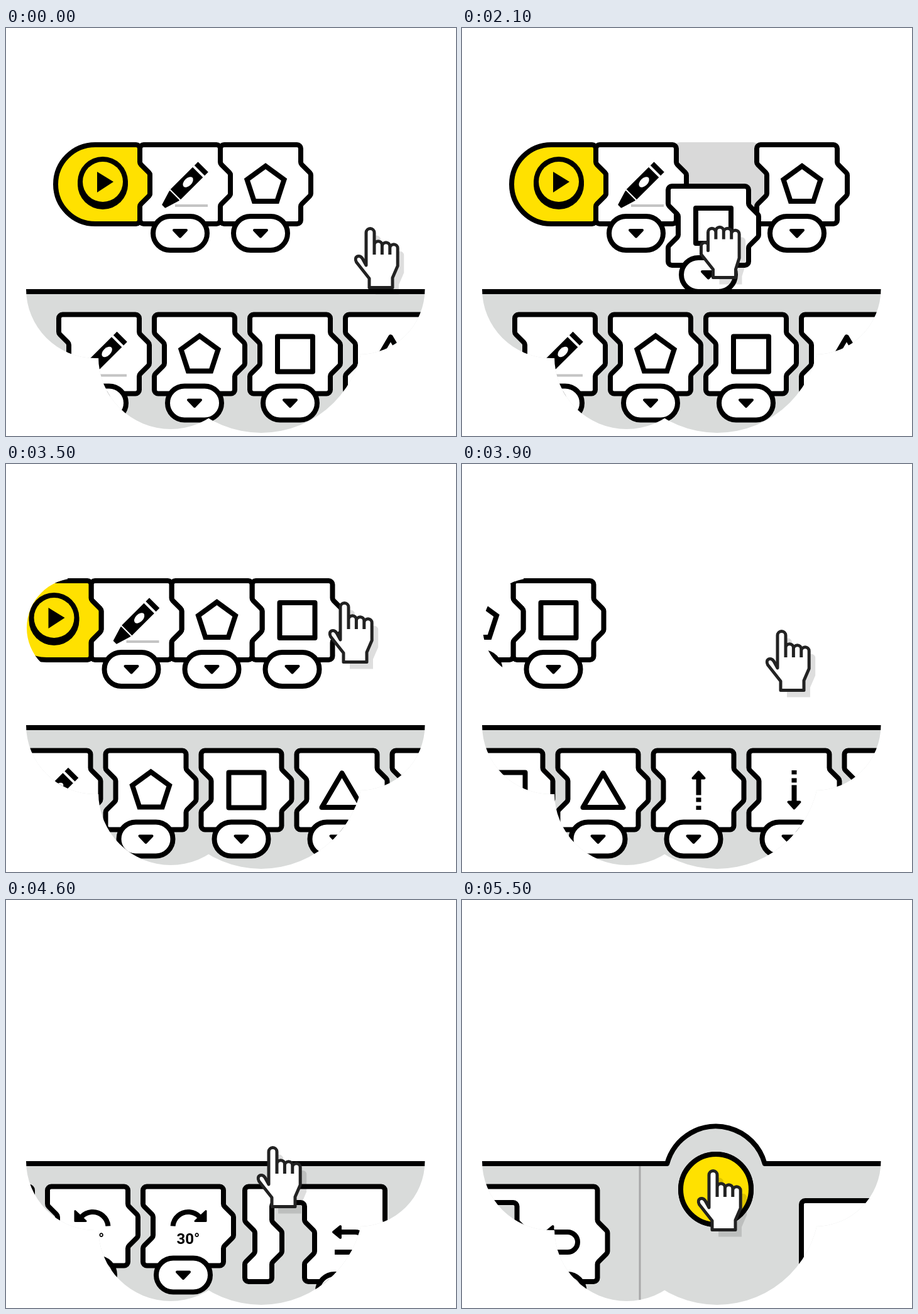
An HTML page with a canvas that plays this animation: 716x650 px, repeating every 7.5 s.

```html
<!DOCTYPE html>
<html lang="en">
<head>
<meta charset="utf-8">
<title>Block coding</title>
<style>
html, body { margin: 0; width: 100%; height: 100%; overflow: hidden; background: #fff; }
canvas { display: block; }
</style>
</head>
<body>
<canvas id="stage" width="716" height="650"></canvas>
<script>
const c = document.getElementById('stage').getContext('2d');
const GREY = '#d9dbda', YELLOW = '#ffe100';
const LOOP = 7500, STEP = 100;
const HOME = 388, SHELF = 456.5, ROW = 186, W = 128, PITCH = 152;

const POINTER = new Path2D('M20 62V10a6.5 6.5 0 0 1 13 0V30a6.2 6.2 0 0 1 12.4 0v2a6.2 6.2 0 0 1 12.4 0' +
  'v3a6.2 6.2 0 0 1 12.4 0V63L62 82V97.5H25V83L4.5 57C0 48 9 44 14 51Z' +
  'M33 29V45M45.4 31V45M57.8 34V45');
const FIST = new Path2D('M14 40V11a6.2 6.2 0 0 1 12.4 0V9a6.2 6.2 0 0 1 12.4 0v2a6.2 6.2 0 0 1 12.4 0' +
  'v3a6.2 6.2 0 0 1 12.4 0V52L58 70V83H22V70L3 46V34a6 6 0 0 1 11-4Z' +
  'M26.4 10V22M38.8 11V22M51.2 13V22');

const clamp = (v, a, b) => Math.min(b, Math.max(a, v));

// Linear interpolation through [time, x, y] keys.
function along(keys, t) {
  let i = 1;
  while (i < keys.length - 1 && t > keys[i][0]) i++;
  const [t0, x0, y0] = keys[i - 1], [t1, x1, y1] = keys[i];
  const k = clamp((t - t0) / (t1 - t0), 0, 1);
  return [x0 + (x1 - x0) * k, y0 + (y1 - y0) * k];
}

const DRAG = [[1200, 0, 0], [1300, -6.5, -30], [1500, -38, -80], [1900, -73, -124], [2000, -70, -165],
  [2100, -60, -204.5], [2700, 80, -290], [3100, 81, -270.5]];
const APPROACH = [[300, 553, 316], [500, 543, 328], [900, 435, 460], [1100, 425, 472]];
const LEAVE = [[3400, 515, 214], [3500, 512, 218], [3900, 482, 263], [4200, 446, 317], [4600, 398, 391],
  [4800, 388, 392], [5200, 388, 392], [5500, 373, 428]];

function ink(fill, width = 8, stroke = '#000') {
  if (fill) { c.fillStyle = fill; c.fill(); }
  if (width) { c.lineWidth = width; c.strokeStyle = stroke; c.stroke(); }
}

function poly(pts, r = 0) {
  const [a, b] = [pts[0], pts[pts.length - 1]];
  c.beginPath();
  c.moveTo((a[0] + b[0]) / 2, (a[1] + b[1]) / 2);
  pts.forEach((p, i) => c.arcTo(...p, ...pts[(i + 1) % pts.length], r));
  c.closePath();
}

function disc(x, y, r, fill, width = 0) {
  c.beginPath();
  c.arc(x, y, r, 0, 7);
  ink(fill, width);
}

function line(pts, width = 8, color = '#000') {
  c.beginPath();
  pts.forEach(p => c.lineTo(...p));
  ink(null, width, color);
}

const tab = (x, y) => [[x, y + 30], [x + 16, y + 46], [x + 16, y + 80], [x, y + 96]];
const notch = (x, y) => tab(x, y).reverse();

function outline(x, y) {
  poly([[x, y], [x + W, y], ...tab(x + W, y), [x + W, y + 126], [x, y + 126], ...notch(x, y)], 6);
}

function pill(x, y) {
  c.beginPath();
  c.roundRect(x - 43, y - 27, 86, 54, 27);
  ink('#fff');
  poly([[x - 10, y - 5], [x + 10, y - 5], [x, y + 5.5]]);
  ink('#000', 4);
}

function straightArrow(dir) {
  c.scale(1, dir);
  poly([[-9, -19], [9, -19], [0, -29]]);
  ink('#000', 4);
  line([[0, -20], [0, 8]]);
  c.fillRect(-4, 12, 8, 7);
  c.fillRect(-4, 25, 8, 6.5);
}

function turnArrow(dir) {
  c.fillStyle = '#000';
  c.font = '700 24px Roboto, sans-serif';
  c.textAlign = 'center';
  c.fillText('30°', 0, 28);
  c.scale(dir, 1);
  c.beginPath();
  c.arc(0, 2, 24.5, Math.PI + .08, -.75);
  ink(null);
  poly([[28, -24], [28, -8], [11, -8]]);
  ink('#000', 3);
}

const icons = {
  crayon() {
    line([[-16, 34], [36, 34]], 4, '#c4c4c4');
    c.translate(-35, 36);
    c.rotate(-Math.PI / 4);
    poly([[2, -3], [25, -10], [25, 10], [2, 3]]);
    ink('#000', 2);
    c.fillRect(28, -11.5, 50, 23);
    c.fillRect(82, -11.5, 8, 23);
    c.beginPath();
    c.ellipse(56, 0, 10, 6, 0, 0, 7);
    ink('#fff', 0);
  },
  pentagon() {
    c.lineJoin = 'miter';
    poly([0, 1, 2, 3, 4].map(i => [31 * Math.sin(i * Math.PI * .4), 2 - 31 * Math.cos(i * Math.PI * .4)]));
    ink(null);
  },
  square() {
    c.beginPath();
    c.rect(-28, -28, 56, 56);
    ink(null);
  },
  triangle() {
    poly([[0, -27], [32, 27.5], [-32, 27.5]]);
    ink(null);
  },
  up: () => straightArrow(1),
  down: () => straightArrow(-1),
  left: () => turnArrow(-1),
  right: () => turnArrow(1)
};

function block(x, y, icon) {
  outline(x, y);
  ink('#fff');
  c.save();
  c.translate(x + 72, y + 63);
  c.fillStyle = '#000';
  icons[icon]();
  c.restore();
  pill(x + 64, y + 141);
}

function startBlock() {
  c.beginPath();
  c.moveTo(142, 186);
  [[213, 186], ...tab(213, 186), [213, 312], [142, 312]].forEach((p, i, all) =>
    all[i + 1] ? c.arcTo(...p, ...all[i + 1], 6) : c.lineTo(...p));
  c.arc(142, 249, 63, Math.PI / 2, Math.PI * 1.5);
  c.closePath();
  ink(YELLOW);
  disc(154, 249, 40, '#000');
  disc(154, 245, 40, '#000');
  disc(154, 245, 32, YELLOW);
  poly([[145, 229], [145, 262], [171, 245]]);
  ink('#000', 0);
}

function repeatBlock(x) {
  const y = 482, inner = x + 95, right = inner + W, slot = x + 43, foot = y + 126;
  poly([[x, SHELF], [right, SHELF], ...tab(right, y), [right, foot], [inner, foot], ...notch(inner, y),
    [inner, y], [slot, y], ...tab(slot, y), [slot, foot], [x, foot], ...notch(x, y)], 6);
  ink('#fff');
  const ax = x + 139;
  poly([[ax + 2, 529], [ax + 13, 520], [ax + 13, 538]]);
  ink('#000', 4);
  c.beginPath();
  c.moveTo(ax + 8, 529);
  c.arc(x + 175.5, 545, 16, -Math.PI / 2, Math.PI / 2);
  c.lineTo(ax + 4, 561);
  ink(null);
  pill(inner + 64, y + 141);
}

function program(t, shift) {
  c.save();
  c.beginPath();
  c.rect(98, 0, 570, 416);
  c.moveTo(191, 261);
  c.arc(112, 261, 79, 0, 7);
  c.clip();
  c.translate(shift, 0);
  const push = t < 2000 || t > 2500 ? 0 : t === 2000 || t === 2500 ? .5 : 1;
  if (t >= 2000 && t < 3100) {
    outline(t < 2500 ? 341 : 469, ROW);
    ink('#d9d9d9', 8, '#d9d9d9');
  }
  if (t >= 3100) block(469, ROW, 'square');
  block(341 + W * push, ROW, 'pentagon');
  block(213, ROW, 'crayon');
  startBlock();
  c.restore();
}

function panel(t, shift) {
  c.save();
  c.beginPath();
  c.rect(33, 300, 634, 116);
  [[142, 416, 110], [262, 524, 115], [406, 482, 163], [562.5, 416, 104]].forEach(([x, y, r]) => {
    c.moveTo(x + r, y);
    c.arc(x, y, r, 0, Math.PI * 2);
  });
  c.clip();
  c.translate(shift, 0);

  const hump = 1721.5;
  c.beginPath();
  c.moveTo(-50, 420);
  c.arc(hump, 441, 80.5, Math.PI + .264, -.264);
  c.lineTo(2600, 420);
  c.lineTo(2600, 700);
  c.lineTo(-50, 700);
  c.closePath();
  ink(GREY);

  Object.keys(icons).forEach((icon, i) => block(84 + i * PITCH, SHELF, icon));
  repeatBlock(1310);
  line([[1600.5, 424], [1600.5, 650]], 3, '#a8a8a8');
  c.beginPath();
  c.roundRect(1857.5, 479, 500, 300, 6);
  ink('#fff');

  const lift = 11 * clamp((5500 - t) / 300, 0, 1);
  disc(hump, 461, 60, '#000');
  disc(hump, 461 - lift, 56, YELLOW, 8);
  c.restore();
}

function hand(shape, x, y) {
  c.save();
  c.translate(x + 10, y + 11);
  c.fillStyle = 'rgba(0,0,0,.13)';
  c.fill(shape);
  c.translate(-10, -11);
  c.fillStyle = '#fff';
  c.fill(shape);
  c.lineWidth = 5;
  c.strokeStyle = '#222';
  c.stroke(shape);
  c.restore();
}

function draw(t) {
  const shift = -77.5 * clamp((t - 3400) / STEP, 0, 17);
  c.fillStyle = '#fff';
  c.fillRect(0, 0, 716, 650);
  c.lineJoin = 'round';
  program(t, shift);
  panel(t, shift);
  if (t >= 1200 && t < 3100) {
    const [dx, dy] = along(DRAG, t);
    block(HOME + dx, SHELF + dy, 'square');
    hand(FIST, 437.5 + dx, 519 + dy);
  } else {
    hand(POINTER, ...along(t < 1200 ? APPROACH : LEAVE, t));
  }
}

function tick() {
  draw(Math.floor(performance.now() % LOOP / STEP) * STEP);
  requestAnimationFrame(tick);
}
tick();
</script>
</body>
</html>
```
